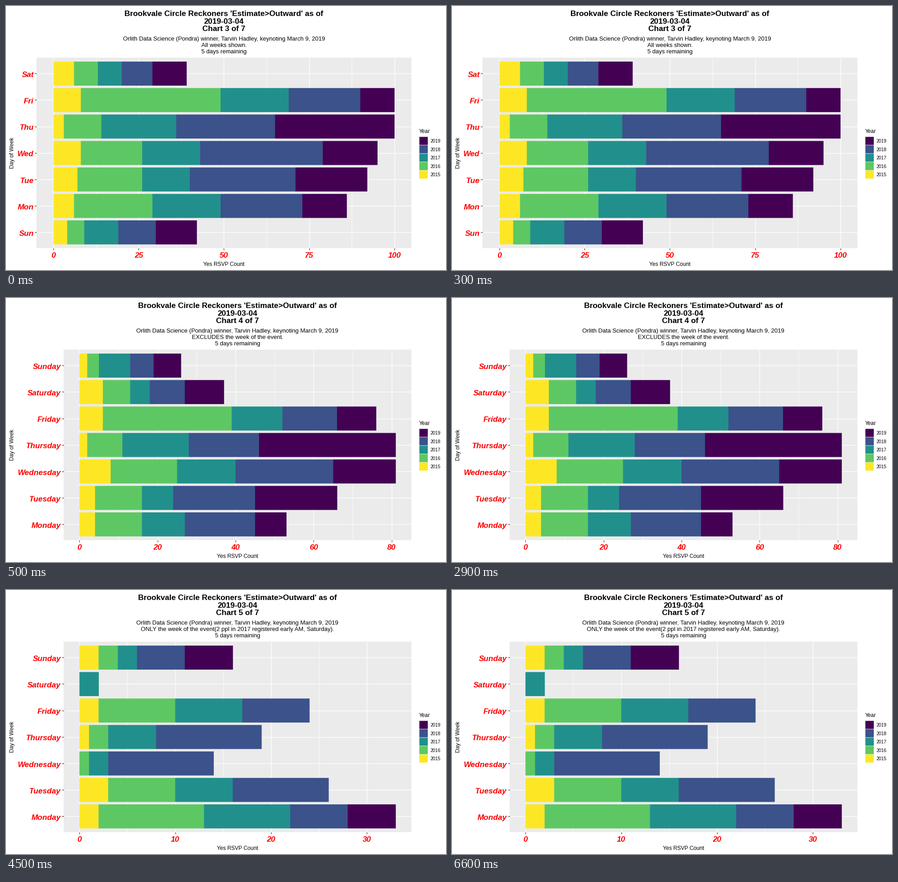
These frames come from a looping animation (966 px wide and 580 px high, 8 s). A matplotlib script:

```python
import matplotlib.pyplot as plt
import numpy as np
from matplotlib.animation import FuncAnimation
from matplotlib.patches import Rectangle

W, H, DPI = 966, 580, 100
TOP, BOTTOM, RIGHT = 113.4, 532, 890
ROW = (BOTTOM - TOP) / 7.2
COLORS = ["#FDE725", "#5DC863", "#21908C", "#3B528B", "#440154"]
DAYS = ["Sunday", "Saturday", "Friday", "Thursday", "Wednesday", "Tuesday", "Monday"]

plt.rcParams["font.family"] = "Liberation Sans"

# Sign-ups per day (rows as in DAYS) and year (2015 to 2019).
EARLY = np.array([[2, 3, 8, 6, 7], [6, 7, 5, 9, 10], [6, 33, 13, 14, 10],
                  [2, 9, 17, 18, 35], [8, 17, 15, 25, 16], [4, 12, 8, 21, 21],
                  [4, 12, 11, 18, 8]])
EVENT_WEEK = np.array([[2, 2, 2, 5, 5], [0, 0, 2, 0, 0], [2, 8, 7, 7, 0],
                       [1, 2, 5, 11, 0], [0, 1, 2, 11, 0], [3, 7, 6, 10, 0],
                       [2, 11, 9, 6, 5]])
ALL_WEEKS = np.roll(EARLY + EVENT_WEEK, -1, axis=0)
SHORT_DAYS = [day[:3] for day in DAYS[1:] + DAYS[:1]]

fig = plt.figure(figsize=(W / DPI, H / DPI), dpi=DPI, facecolor="white")


def px(size):
    return size * 72 / DPI


def rect(ax, x0, y0, x1, y1, color):
    ax.add_patch(Rectangle((x0, y0), x1 - x0, y1 - y0, fc=color, lw=0,
                           snap=False, zorder=2))


def line(ax, xs, ys, color, width):
    ax.plot(xs, ys, color=color, lw=px(width), solid_capstyle="butt",
            snap=True, zorder=2)


def text(ax, x, y, s, size, ha="center", **kw):
    ax.text(x, y, s, fontsize=px(size), ha=ha, va="baseline", **kw)


def red_label(ax, x, y, s, ha):
    text(ax, x, y, s, 17.1, ha, color="red", weight="bold", style="italic")


def draw_heading(ax, mid, number, note):
    title = ["Brookvale Circle Reckoners 'Estimate>Outward' as of",
             "2019-03-04", f"Chart {number} of 7"]
    sub = ["Orlith Data Science (Pondra) winner, Tarvin Hadley, keynoting March 9, 2019",
           note, "5 days remaining"]
    for i in range(3):
        text(ax, mid, 22 + 16.7 * i, title[i], 17.1, weight="bold")
        text(ax, mid, 76 + 14 * i, sub[i], 13)


def draw_legend(ax):
    text(ax, 907, 279, "Year", 12, "left")
    for i, color in enumerate(reversed(COLORS)):
        y = 287.3 + 18.5 * i
        rect(ax, 907.5, y + 0.2, 926, y + 17.9, color)
        text(ax, 931, y + 13, str(2019 - i), 10, "left")


def draw_grid(ax, left, zero, unit, step, top_value):
    rect(ax, left, TOP, RIGHT, BOTTOM, "#EBEBEB")
    for value in np.arange(step / 2, 1.05 * top_value, step):
        x = zero + value * unit
        line(ax, [x, x], [TOP, BOTTOM], "white", 0.75)
    for i in range(7):
        y = TOP + (0.6 + i) * ROW
        line(ax, [left, RIGHT], [y, y], "white", 1.4)
        line(ax, [left - 4, left], [y, y], "#333333", 1.2)
    for value in range(0, top_value + 1, step):
        x = zero + value * unit
        line(ax, [x, x], [TOP, BOTTOM], "white", 1.4)
        line(ax, [x, x], [BOTTOM, BOTTOM + 4], "#333333", 1.2)
        red_label(ax, x, 553.4, str(value), "center")


def draw_chart(number, note, left, days, step, counts):
    ax = fig.add_axes([0, 0, 1, 1], xlim=(0, W), ylim=(H, 0))
    ax.axis("off")
    mid = (left + RIGHT) / 2
    top_value = counts.sum(axis=1).max()
    unit = (RIGHT - left) / (1.1 * top_value)
    zero = left + 0.05 * top_value * unit

    draw_grid(ax, left, zero, unit, step, top_value)
    for i, (day, row) in enumerate(zip(days, counts)):
        y = TOP + (0.6 + i) * ROW
        red_label(ax, left - 6, y + 7.7, day, "right")
        x = zero
        for count, color in zip(row, COLORS):
            if count:
                # A slight overhang hides the seam to the next segment.
                rect(ax, x, y - 0.45 * ROW, x + count * unit + 0.5,
                     y + 0.45 * ROW + 0.5, color)
            x += count * unit

    draw_heading(ax, mid, number, note)
    text(ax, mid, 571, "Yes RSVP Count", 12)
    text(ax, 17.5, (TOP + BOTTOM) / 2, "Day of Week", 12,
         rotation=90, rotation_mode="anchor")
    draw_legend(ax)
    return ax


pages = [
    draw_chart(3, "All weeks shown.", 67, SHORT_DAYS, 25, ALL_WEEKS),
    draw_chart(4, "EXCLUDES the week of the event.", 126.5, DAYS, 20, EARLY),
    draw_chart(5, "ONLY the week of the event(2 ppl in 2017 registered early AM, Saturday).",
               126.5, DAYS, 10, EVENT_WEEK),
]


def update(frame):
    current = 0 if frame < 1 else 1 if frame < 9 else 2
    for i, page in enumerate(pages):
        page.set_visible(i == current)
    return pages


anim = FuncAnimation(fig, update, frames=16, init_func=lambda: update(0),
                     interval=500, repeat=True, repeat_delay=0, blit=False)
plt.show()
```
